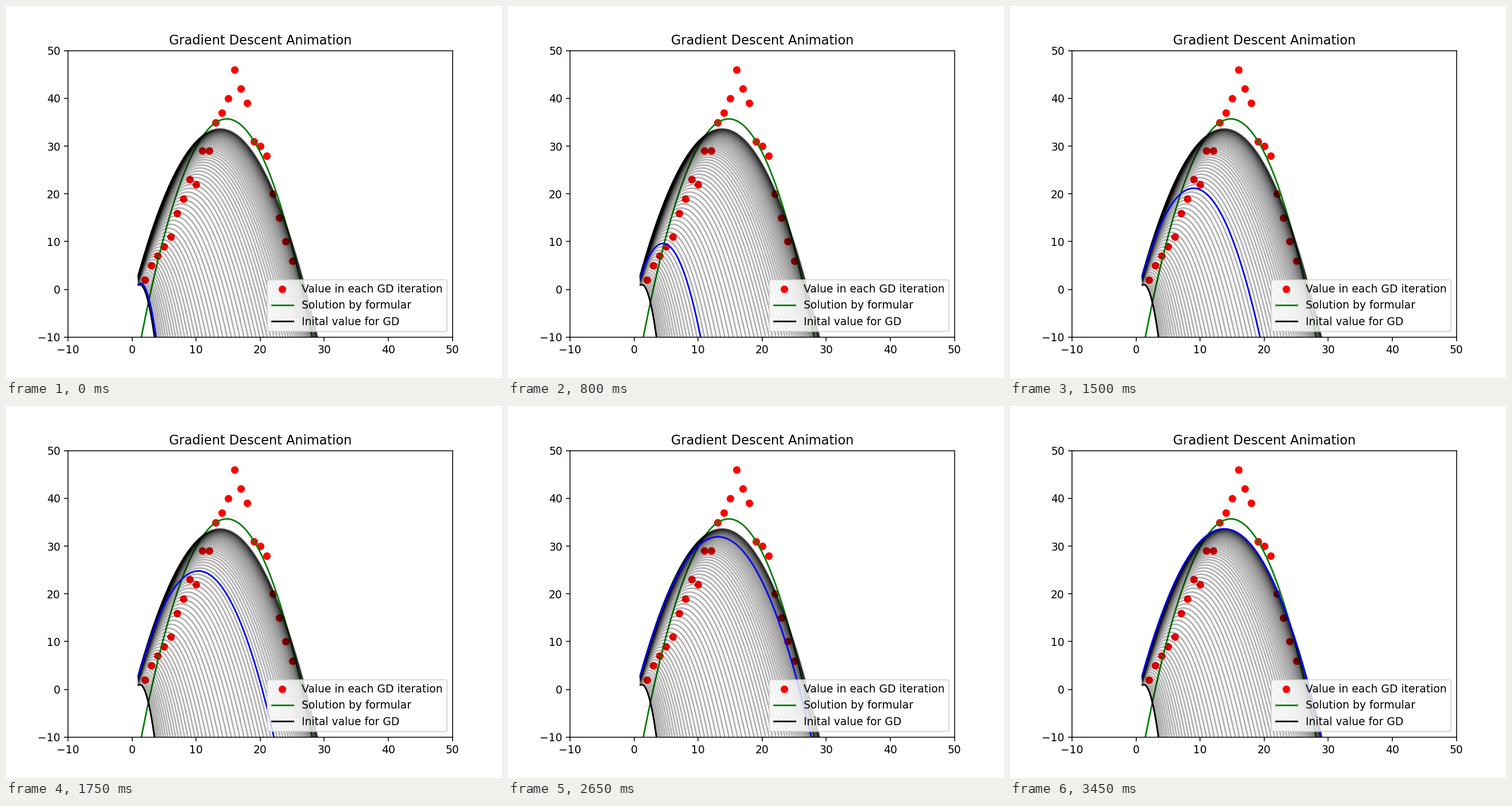
A matplotlib script that plays this animation: 864x648 px, repeating every 3.5 s.

```python
import numpy as np
import matplotlib.pyplot as plt
from matplotlib.animation import FuncAnimation

STEPS = 70
RATE = 1e-6

xs = np.arange(2, 26)
ys = np.array([2, 5, 7, 9, 11, 16, 19, 23, 22, 29, 29, 35,
               37, 40, 46, 42, 39, 31, 30, 28, 20, 15, 10, 6])
A = np.vander(xs, 3).astype(float)


def descend(w):
    """Return every weight vector visited by gradient descent."""
    path = [w]
    for _ in range(STEPS):
        w = w - RATE * A.T @ (A @ w - ys) / len(ys)
        path.append(w)
    return path


best = np.linalg.lstsq(A, ys, rcond=None)[0]
path = descend(np.array([-2.1, 5.1, -2.1]))
grid = np.linspace(1, 30, 1000)

fig = plt.figure(figsize=(6.4, 4.8), dpi=135)
ax = plt.axes(xlim=(-10, 50), ylim=(-10, 50))
ax.set_title("Gradient Descent Animation")

ax.plot(xs, ys, "ro", label="Value in each GD iteration")
ax.plot(grid, np.polyval(best, grid), color="green", label="Solution by formular")
ax.plot(grid, np.polyval(path[0], grid), color="black", label="Inital value for GD")
for w in path:
    ax.plot(grid, np.polyval(w, grid), color="black", alpha=0.3)
current, = ax.plot([], [], color="blue")
ax.legend(loc="lower right")


def update(i):
    current.set_data(grid, np.polyval(path[i + 1], grid))
    return current,


anim = FuncAnimation(fig, update, frames=STEPS, interval=50,
                     repeat=True, repeat_delay=0, blit=False)
plt.show()
```
